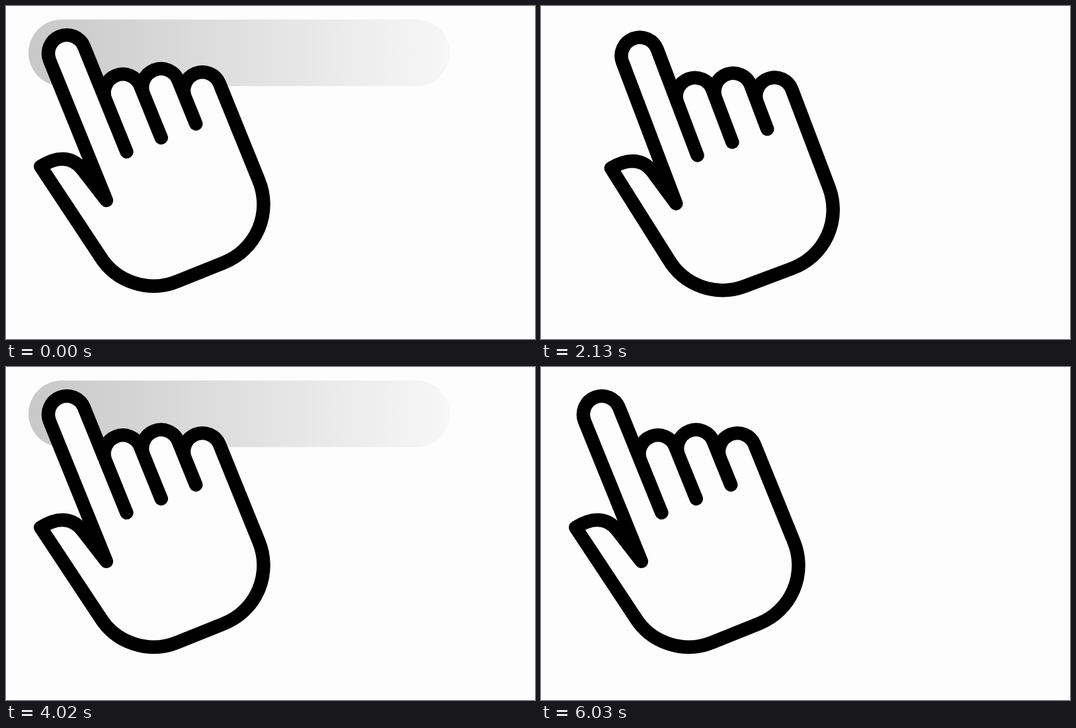
An HTML page that plays this animation: 800 px wide and 505 px high, repeating every 6060 ms.

```html
<!DOCTYPE html>
<html lang="en">
<head>
<meta charset="utf-8">
<title>Swipe gesture</title>
<style>
  html, body { margin: 0; width: 100%; height: 100%; overflow: hidden; background: #fdfdfd; }
  svg { display: block; width: 800px; height: 505px; }
</style>
</head>
<body>
<svg viewBox="0 0 800 505">
  <defs>
    <linearGradient id="shade" gradientUnits="userSpaceOnUse" x1="34" x2="671" y1="0" y2="0">
      <stop offset="0" stop-color="#c8c8c8"/>
      <stop offset="1" stop-color="#f7f7f7"/>
    </linearGradient>
  </defs>
  <rect id="trail" y="20.5" height="101" rx="50.5" fill="url(#shade)"/>
  <!-- Upright hand; the origin is the centre of the fingertip -->
  <path id="hand" fill="#fdfdfd" stroke="#000" stroke-width="20.5" stroke-linejoin="round"
    d="M-28 229 V0 A28 28 0 0 1 28 0 V172 V87
       A28.25 28.25 0 0 1 84.5 87 V172 V101
       A28.25 28.25 0 0 1 141 101 V172 V129
       A28 28 0 0 1 197 129 V288
       A95 95 0 0 1 102 383 H25
       A95 95 0 0 1 -68.7 303.5 L-101 144
       C-68 138 -50 150 -44 172 Z"/>
</svg>
<script>
const LOOP = 6060, SWIPE = 1980, STEP = 30;
const TRAIL_START = 1110, TRAIL_END = 75, TRAIL_RIGHT = 671;

// time, fingertip x, fingertip y, tilt in degrees
const keys = [
  [0, 92, 72, -22],
  [90, 92, 72, -22],
  [150, 149.5, 75.5, -20.7],
  [300, 345, 68, -3],
  [450, 474, 64, 12.5],
  [540, 511, 65.5, 15],
  [630, 550, 68.5, 17.3],
  [750, 586.5, 73.5, 19.3],
  [840, 602, 75, 20.8],
  [990, 617.5, 76.5, 22],
  [1080, 620, 78, 22],
  [1170, 615, 79.5, 21.8],
  [1260, 590, 82, 20.5],
  [1440, 445, 89, 13],
  [1620, 258, 85, 0],
  [1710, 180, 80, -6.5],
  [1800, 136, 76, -13],
  [1890, 106.5, 73, -18.5],
  [1980, 92, 72, -22]
];

const slope = (i, c) => (keys[i + 1][c] - keys[i][c]) / (keys[i + 1][0] - keys[i][0]);

// Monotone tangent: flat at the ends and at turning points
function tangent(i, c) {
  if (i === 0 || i === keys.length - 1) return 0;
  const a = slope(i - 1, c), b = slope(i, c);
  return a * b > 0 ? 2 * a * b / (a + b) : 0;
}

function valueAt(time, c) {
  let i = 0;
  while (time >= keys[i + 1][0]) i++;
  const span = keys[i + 1][0] - keys[i][0];
  const u = (time - keys[i][0]) / span, v = 1 - u;
  return keys[i][c] * v * v * (1 + 2 * u) + keys[i + 1][c] * u * u * (1 + 2 * v)
    + span * u * v * (tangent(i, c) * v - tangent(i + 1, c) * u);
}

const hand = document.getElementById("hand");
const trail = document.getElementById("trail");
const start = performance.now();

function draw(now) {
  const elapsed = Math.max(0, now - start) % LOOP;
  const time = Math.floor(elapsed / STEP) * STEP % SWIPE;
  const [x, y, tilt] = [1, 2, 3].map(c => valueAt(time, c));
  hand.setAttribute("transform", `translate(${x} ${y}) rotate(${tilt})`);

  const shown = time < TRAIL_END || time > TRAIL_START;
  const left = x - 58;
  trail.setAttribute("visibility", shown ? "visible" : "hidden");
  trail.setAttribute("x", left);
  trail.setAttribute("width", TRAIL_RIGHT - left);
  requestAnimationFrame(draw);
}
draw(start);
</script>
</body>
</html>
```
